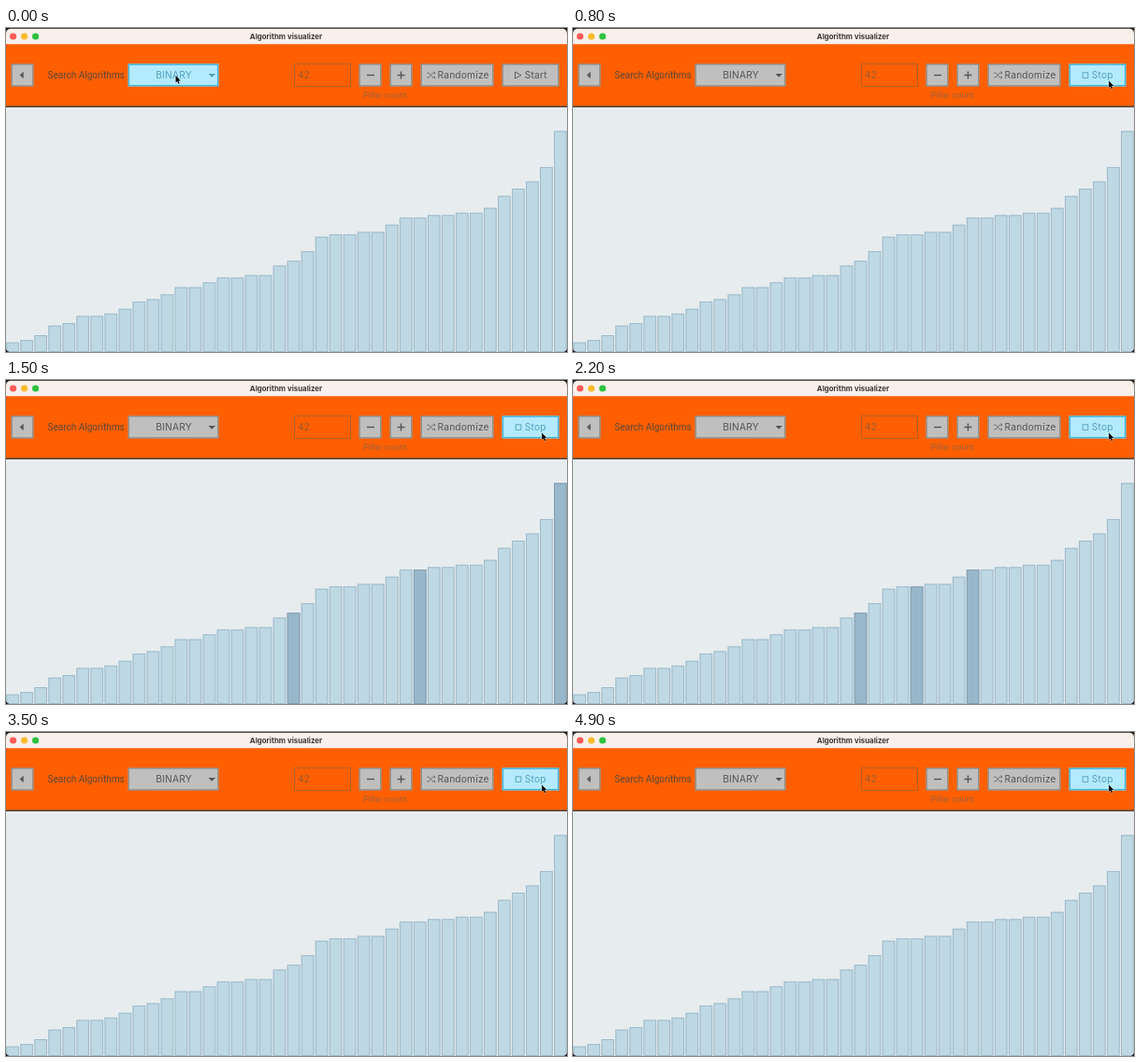
Recreate the animation shown at these times as an HTML page with a canvas. Size 600 px wide and 347 px high, loop 5000 ms.

```html
<!DOCTYPE html>
<html lang="en">
<head>
<meta charset="utf-8">
<title>Algorithm visualizer</title>
<style>
  html, body { margin: 0; width: 100%; height: 100%; overflow: hidden; background: #1c1c1c; }
  canvas { display: block; width: 600px; height: 347px; }
</style>
</head>
<body>
<canvas id="stage" width="600" height="347"></canvas>
<script>
const ctx = document.getElementById('stage').getContext('2d');
const W = 600, H = 347, LOOP = 5000;

const VALUES = [4, 5, 7, 11, 12, 15, 15, 16, 18, 21,
                22, 24, 27, 27, 29, 31, 31, 32, 32, 36,
                38, 42, 48, 49, 49, 50, 50, 53, 56, 56,
                57, 57, 58, 58, 60, 65, 68, 71, 77, 92];
const UNIT = 2.572, PITCH = 15.02, BAR_W = 13.7;
const TARGET = VALUES.indexOf(42);
const FIRST_STEP = 850, STEP = 640;   // binary search pace
const BLINK_START = 3650, BLINK = 200;
const CLICK = 650;

const BAR = { fill: '#bed8e4', edge: '#9fbbc8' };
const ACTIVE = { fill: '#99b7ca', edge: '#839fb0' };
const FOUND = { fill: '#f2aca4', edge: '#dc958d' };
const IDLE = { fill: '#bfbfbf', edge: '#858179', ink: '#555555' };
const HOVER = { fill: '#b3eafd', edge: '#45b5dc', ink: '#519fbe' };

// [low, mid, high] for every pass of the search
function searchSteps() {
  const steps = [];
  let low = 0, high = VALUES.length - 1;
  while (low <= high) {
    const mid = (low + high) >> 1;
    steps.push([low, mid, high]);
    if (mid === TARGET) break;
    if (mid < TARGET) low = mid + 1; else high = mid - 1;
  }
  return steps;
}
const STEPS = searchSteps();

function text(str, x, y, font, color, align = 'left', spacing = 0) {
  ctx.font = font;
  ctx.fillStyle = color;
  ctx.textAlign = align;
  ctx.letterSpacing = spacing + 'px';
  ctx.fillText(str, x, y);
}

function poly(points, close = true) {
  ctx.beginPath();
  points.forEach(([x, y]) => ctx.lineTo(x, y));
  if (close) ctx.closePath();
}

function label(str, x, ink, align) {
  text(str, x, 54, '10.2px Inter, sans-serif', ink, align, 0.2);
}

function box(x, y, w, h, style, line = 1) {
  ctx.fillStyle = style.fill;
  ctx.fillRect(x, y, w, h);
  ctx.strokeStyle = style.edge;
  ctx.lineWidth = line;
  ctx.strokeRect(x + line / 2, y + line / 2, w - line, h - line);
}

function button(x, w, mouse, drawFace) {
  const over = mouse.x >= x && mouse.x < x + w && mouse.y >= 39 && mouse.y < 62;
  const style = over ? HOVER : IDLE;
  box(x - 0.4, 38.4, w + 0.8, 24.1, style, over ? 1.5 : 1.1);
  ctx.fillStyle = ctx.strokeStyle = style.ink;
  drawFace(style.ink);
}

function shuffleIcon() {
  ctx.lineWidth = 0.7;
  for (const s of [-1, 1]) {
    const y = 50.5 + 2.5 * s, end = 50.5 - 2.5 * s;
    poly([[450, y], [452, y], [456.5, end], [459, end]], false);
    ctx.stroke();
    poly([[457.6, end - 1.4], [459, end], [457.6, end + 1.4]], false);
    ctx.stroke();
  }
}

function toolbar(t, mouse) {
  ctx.fillStyle = '#ff5f00';
  ctx.fillRect(0, 17.3, W, 67);
  ctx.fillStyle = '#4a4441';
  ctx.fillRect(0, 83.5, W, 1.5);

  button(6, 23, mouse, () => {
    poly([[18.7, 46.8], [18.7, 54.2], [14.8, 50.5]]);
    ctx.fill();
  });
  text('Search Algorithms', 44.6, 54, '10px Roboto, sans-serif', '#5a483d');
  button(131, 96, mouse, ink => {
    poly([[216.5, 49], [224, 49], [220.2, 52.8]]);
    ctx.fill();
    label('BINARY', 179.5, ink, 'center');
  });

  ctx.strokeStyle = '#b0602c';
  ctx.lineWidth = 1;
  ctx.strokeRect(308.5, 38.5, 60, 24);
  label('42', 312, '#955a34');
  text('Pillar count', 405.5, 75, '9.3px Roboto, sans-serif', '#9a6340', 'center');

  button(378, 23, mouse, () => ctx.fillRect(386, 49.8, 8, 1.4));
  button(411, 23, mouse, () => {
    ctx.fillRect(418.5, 49.8, 8, 1.4);
    ctx.fillRect(421.8, 46.5, 1.4, 8);
  });
  button(444, 77, mouse, ink => {
    shuffleIcon();
    label('Randomize', 461.5, ink);
  });
  button(531, 60, mouse, ink => {
    ctx.lineWidth = 0.9;
    if (t < CLICK) {
      poly([[544.5, 47], [551, 50.5], [544.5, 54]]);
      ctx.stroke();
    } else {
      ctx.strokeRect(545.2, 47.8, 5.6, 5.6);
    }
    label(t < CLICK ? 'Start' : 'Stop', 554.8, ink);
  });
}

function titleBar() {
  ctx.fillStyle = '#f9f0eb';
  ctx.fillRect(0, 0, W, 17.5);
  ['#fc5b57', '#fdbb2e', '#2fc340'].forEach((color, i) => {
    ctx.fillStyle = color;
    ctx.beginPath();
    ctx.arc(7.6 + 12 * i, 9, 3.6, 0, 2 * Math.PI);
    ctx.fill();
  });
  text('Algorithm visualizer', 299.5, 11.6, 'bold 7.9px Inter, sans-serif', '#3b3634', 'center');
}

function bars(t) {
  const marked = STEPS[Math.floor((t - FIRST_STEP) / STEP)] || [];
  const blink = Math.floor((t - BLINK_START) / BLINK);
  const lit = blink >= 0 && blink < 6 && blink % 2 === 0;
  VALUES.forEach((value, i) => {
    const style = lit && i === TARGET ? FOUND : marked.includes(i) ? ACTIVE : BAR;
    const h = value * UNIT;
    box(0.3 + PITCH * i, H - h, BAR_W, h, style);
  });
}

function mouseAt(t) {
  const p = Math.min(1, Math.max(0, (t - 50) / 530));
  const k = p * p * (3 - 2 * p);
  return { x: 181.5 + 391.5 * k, y: 51 + 5.5 * k };
}

function pointer({ x, y }) {
  ctx.save();
  ctx.translate(x, y);
  poly([[0, 0], [0, 7.6], [1.7, 6.1], [2.9, 8.8], [4.2, 8.2], [3, 5.6], [5.3, 5.5]]);
  ctx.lineWidth = 1;
  ctx.strokeStyle = 'rgba(255,255,255,0.6)';
  ctx.stroke();
  ctx.fillStyle = '#000';
  ctx.fill();
  ctx.restore();
}

function draw(t) {
  const mouse = mouseAt(t);
  ctx.fillStyle = '#1c1c1c';
  ctx.fillRect(0, 0, W, H);
  ctx.save();
  ctx.beginPath();
  ctx.roundRect(0, 0.8, W, H - 0.8, 5);
  ctx.clip();
  ctx.fillStyle = '#e7ecef';
  ctx.fillRect(0, 17, W, H - 17);
  titleBar();
  toolbar(t, mouse);
  bars(t);
  pointer(mouse);
  ctx.restore();
}

const start = performance.now();
function tick() {
  draw((performance.now() - start) % LOOP);
  requestAnimationFrame(tick);
}
tick();
</script>
</body>
</html>
```
